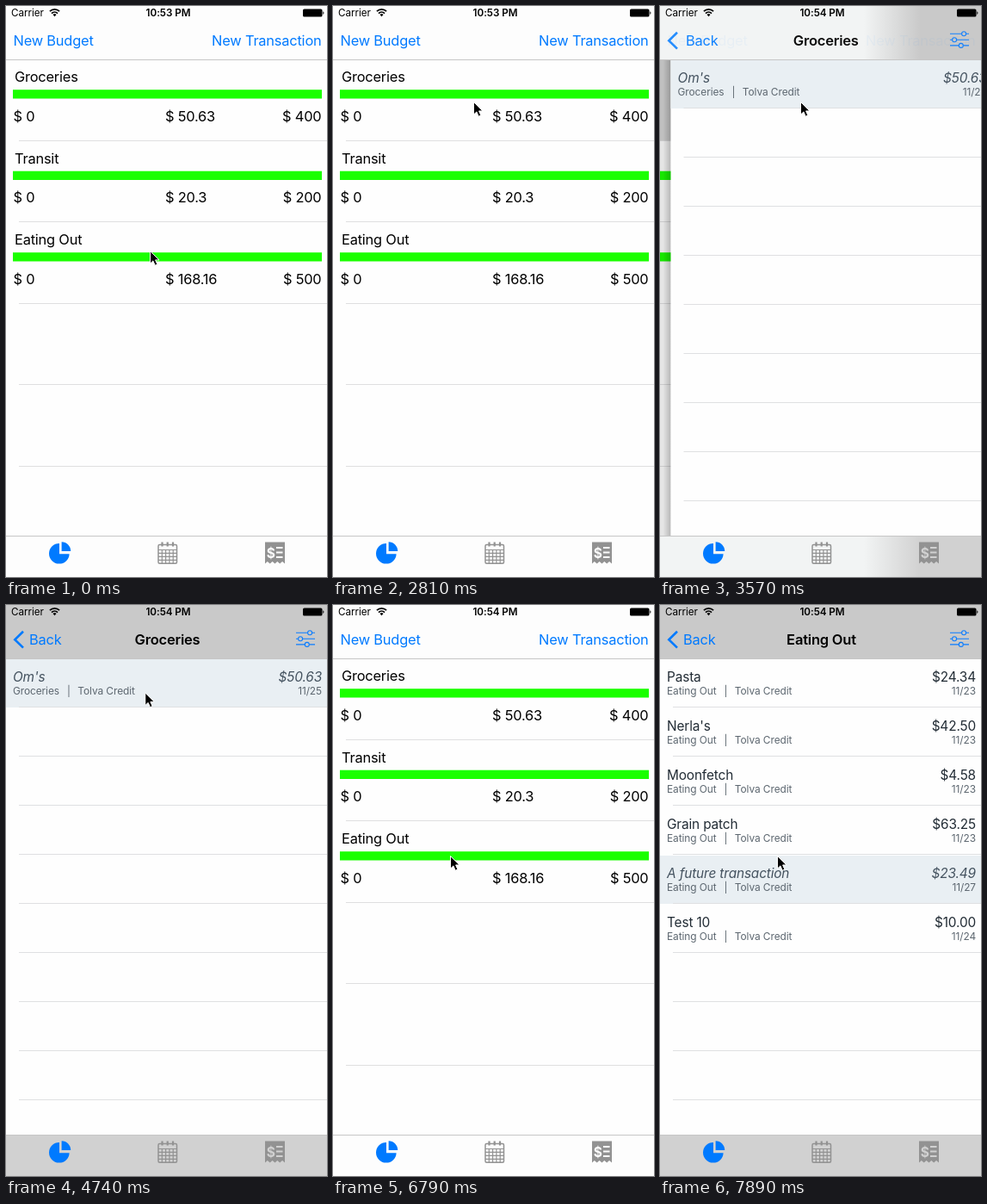
These frames come from a looping animation (373 px wide and 663 px high, 8000 ms). An HTML page:

```html
<!DOCTYPE html>
<html lang="en">
<head>
<meta charset="utf-8">
<title>Budget app</title>
<style>
  html, body { margin: 0; width: 100%; height: 100%; overflow: hidden; background: #fefefe; }
  svg { display: block; width: 373px; height: 663px; }
  text { font-family: Inter, "Open Sans", sans-serif; font-size: 16.4px; letter-spacing: -.2px; white-space: pre; }
  .end { text-anchor: end; }
  .mid { text-anchor: middle; }
  .blue { fill: #007aff; }
  .title { font-weight: 600; font-size: 16.5px; }
  .status { font-size: 11.7px; letter-spacing: -.05px; }
  .name { font-size: 15.4px; fill: #222c35; letter-spacing: -.15px; }
  .sub { font-size: 11.9px; fill: #5d6770; letter-spacing: -.08px; }
  .future .name { font-style: italic; fill: #44525f; }
</style>
</head>
<body>
<svg id="stage" viewBox="0 0 373 663"></svg>
<script>
const W = 373, LOOP = 8000;
const PUSH_A = 3285, POP = 5665, PUSH_B = 7025, SLIDE = 545;
const BANK = 'Tolva Credit';

const budgets = [
  ['Groceries', '50.63', 400],
  ['Transit', '20.3', 200],
  ['Eating Out', '168.16', 500]
];
const details = [
  { title: 'Groceries', rows: [['Om\'s', '50.63', 25, true]] },
  { title: 'Eating Out', rows: [
    ['Pasta', '24.34', 23],
    ['Nerla\'s', '42.50', 23],
    ['Moonfetch', '4.58', 23],
    ['Grain patch', '63.25', 23],
    ['A future transaction', '23.49', 27, true],
    ['Test 10', '10.00', 24]
  ] }
];

// Cursor tip: time, x, y
const path = [
  [0, 167, 284], [200, 167, 284], [380, 164, 322], [620, 173, 392], [980, 177, 297],
  [1070, 177, 297], [1210, 177, 311], [2070, 177, 311], [2360, 154, 225], [2560, 142, 150],
  [2810, 163, 111], [4480, 163, 111], [4570, 164, 106], [4700, 164, 106], [4910, 150, 83],
  [5050, 150, 83], [5370, 30, 36], [5860, 30, 36], [6340, 100, 173], [6600, 126, 250],
  [6790, 136, 291], [LOOP, 136, 291]
];

const text = (x, y, s, cls = '') => `<text x="${x}" y="${y}" class="${cls}">${s}</text>`;
const rect = (x, y, w, h, fill, more = '') =>
  `<rect x="${x}" y="${y}" width="${w}" height="${h}" fill="${fill}" ${more}/>`;
const range = n => [...Array(n).keys()];

function budgetRow([name, left, total], i) {
  const y = 62 + i * 94.5;
  return rect(0, y + .5, W, 94, '#d5d5d5', `id="pick${i}"`) +
    rect(8, y + 35.2, 359, 10.3, '#1aff00', `id="bar${i}"`) +
    text(10, y + 26, name) + text(8.5, y + 71.5, '$ 0') +
    text(185, y + 71.5, '$ ' + left) + text(366.5, y + 71.5, '$ ' + total, 'end');
}

function detailRow(group, [name, sum, day, future], i) {
  const y = 62 + i * 57;
  return `<g class="${future ? 'future' : ''}">` +
    (future ? rect(0, y + 1, W, 56, '#e9eff3') : '') +
    text(8, y + 26.5, name, 'name') + text(367, y + 26.5, '$' + sum, 'name end') +
    `<text x="8" y="${y + 42}" class="sub">${group}<tspan dx="9">|</tspan><tspan dx="8.5">${BANK}</tspan></text>` +
    text(367, y + 42, '11/' + day, 'sub end') + '</g>';
}

const detailTable = (d, i) => `<g id="table${i}">` +
  d.rows.map((r, k) => detailRow(d.title, r, k)).join('') + '</g>';

const pie = `<g fill="#007aff">
  <path d="M62 624A11.8 11.8 0 1 0 73.6 636.2H62Z"/>
  <path d="M64.6 622.2A10.6 10.6 0 0 1 75.2 633H64.6Z"/></g>`;

const calendar = `<g fill="none" stroke="#929292" stroke-width="1.2">
  <rect x="177" y="625.5" width="21.5" height="21.8" rx="1.5" stroke-width="1.5"/>
  <path d="M177 631.5h21.5M177 635.4h21.5M177 639.4h21.5M177 643.4h21.5"/>
  <path d="${range(4).map(i => `M${181.3 + i * 4.3} 631.5v15.5`).join('')}"/>
  <path d="M181.5 622.5v5M187.7 622.5v5M194 622.5v5" stroke-width="2.2"/></g>`;

const receipt = `<mask id="cut">${rect(295, 615, 40, 40, '#fff')}
  <text x="307.8" y="641" class="mid" style="font-size:15.5px;font-weight:700">$</text>
  <path d="M314 629h7.5M314 634.5h7.5M314 640h7.5" stroke="#000" stroke-width="2"/></mask>
  <path mask="url(#cut)" fill="#929292" d="M301 622.5H324V647.5l-2.9-2.6-2.9 2.6-2.9-2.6-2.8 2.6-2.9-2.6-2.9 2.6-2.9-2.6-2.8 2.6Z"/>`;

const wifi = `<g fill="none" stroke="#000" stroke-width="1.7">
  <path d="M50.9 6.2a8 8 0 0 1 11.2 0M53 8.6a5 5 0 0 1 7 0"/>
  <path d="M56.5 12.2l-2-2.2a3 3 0 0 1 4 0z" fill="#000" stroke="none"/></g>`;

const battery = rect(345, 3.5, 22.5, 9, '#000', 'rx="1.6"') +
  '<path d="M368.3 6.3a2 2 0 0 1 0 3.6z"/>';

const sliders = `<g id="sliders" fill="none" stroke="#0a7cff" stroke-width="1.1">
  <path d="M337 32.3h13.5M355.7 32.3h3.3M337 39.2h2.5M344.7 39.2H359M337 45.9h10.2M352.4 45.9h6.6"/>
  <circle cx="353.1" cy="32.3" r="2.5"/><circle cx="342.1" cy="39.2" r="2.5"/><circle cx="349.8" cy="45.9" r="2.5"/></g>`;

const stage = document.getElementById('stage');
stage.innerHTML = `
  <defs>
    <linearGradient id="glass" gradientUnits="userSpaceOnUse" y1="0" y2="0">
      <stop id="glassA" offset="0"/><stop id="glassB" offset="1" stop-opacity="0"/>
    </linearGradient>
    <linearGradient id="edge"><stop stop-opacity="0"/><stop offset="1" stop-opacity=".2"/></linearGradient>
  </defs>
  <g id="home">
    ${rect(0, 0, W, 663, '#fefefe')}
    ${budgets.map(budgetRow).join('')}
    ${range(5).map(i => rect(15, Math.floor(156 + i * 94.5), 358, 1, '#dfdfe0')).join('')}
    ${rect(0, 0, W, 663, '#000', 'id="dim"')}
  </g>
  <g id="detail">
    ${rect(-9, 62, 9, 554, 'url(#edge)')}
    ${rect(0, 62, W, 554, '#fefefe')}
    ${details.map(detailTable).join('')}
    ${range(9).map(i => rect(15, 118 + i * 57, 358, 1, '#dfe0e2')).join('')}
  </g>
  ${rect(0, 0, W, 62, '#c9c9c9')}${rect(0, 615, W, 48, '#d1d1d1')}
  ${rect(0, 0, W, 62, 'url(#glass)')}${rect(0, 615, W, 48, 'url(#glass)')}
  ${rect(0, 62, W, 1, '#c6c6c6')}${rect(0, 615, W, 1, '#c6c6c6')}
  <g id="homeNav">${text(8.5, 46, 'New Budget', 'blue')}${text(366.5, 46, 'New Transaction', 'blue end')}</g>
  <g id="detailNav">
    <path id="chevron" d="M20 30.8L10.3 40.2L20 49.6" fill="none" stroke="#007aff" stroke-width="2.6"/>
    <text id="back" y="46" class="blue">Back</text>
    <text id="title" y="46" class="title mid"></text>
    ${sliders}
  </g>
  ${text(6, 12.4, 'Carrier', 'status')}${wifi}
  <text id="clock" x="188.5" y="12.4" class="status mid" style="font-weight:600"></text>
  ${battery}${pie}${calendar}${receipt}
  <path id="cursor" d="M.5 .5V15L3.9 11.9L6.2 17.2L8.9 16L6.6 10.9H11Z" stroke="#fff" stroke-width="1"/>`;

const el = {};
stage.querySelectorAll('[id]').forEach(n => el[n.id] = n);
const set = (id, attrs) => { for (const k in attrs) el[id].setAttribute(k, attrs[k]); };
const show = (id, on) => el[id].style.display = on ? '' : 'none';

function spring(ms) {
  const u = 18.26 * Math.max(0, ms) / 1000;
  return 1 - (1 + u) * Math.exp(-u);
}

// 0 = budget list, 1 = transactions
function progress(t) {
  if (t < PUSH_A) return 0;
  if (t < POP) return t < PUSH_A + SLIDE ? spring(t - PUSH_A) : 1;
  if (t < PUSH_B) return t < POP + SLIDE ? 1 - spring(t - POP) : 0;
  return t < PUSH_B + SLIDE ? spring(t - PUSH_B) : 1;
}

function cursorAt(t) {
  const i = path.findIndex(k => k[0] > t);
  const [t0, x0, y0] = path[i - 1], [t1, x1, y1] = path[i];
  const f = (t - t0) / (t1 - t0);
  return [x0 + (x1 - x0) * f, y0 + (y1 - y0) * f];
}

function draw(t) {
  const p = progress(t), q = 1 - p, x = W * q;
  const page = t < 6500 ? 0 : 1;
  const pressed = t >= 5540 && t < POP;
  const picks = [t >= 3250 && t < POP, false, t >= 6960];

  set('home', { transform: `translate(${-.3 * W * p} 0)` });
  set('dim', { opacity: .1 * p });
  set('detail', { transform: `translate(${x} 0)` });
  show('detail', p > 0);
  picks.forEach((on, i) => { show('pick' + i, on); show('bar' + i, !on); });
  details.forEach((d, i) => show('table' + i, i === page));

  // Light from the list shows through the bars until it has left.
  const edge = p === 0 ? 900 : p === 1 ? -900 : W - .3 * W * p;
  const light = `rgb(${253 - 11 * p},${253 - 9 * p},${253 - 9 * p})`;
  set('glass', { x1: edge - 28, x2: edge + 38 });
  set('glassA', { 'stop-color': light });
  set('glassB', { 'stop-color': light });

  set('homeNav', { opacity: p === 1 ? 0 : .04 + .96 * q * q });
  show('detailNav', p > 0);
  set('chevron', { opacity: pressed ? .3 : p ** 5 });
  set('back', { x: 27 + .242 * x, opacity: pressed ? .3 : p ** 2 });
  set('title', { x: 187.5 + .42 * x, opacity: p ** 1.6 });
  set('sliders', { opacity: p ** 1.5 });
  el.title.textContent = details[page].title;
  el.clock.textContent = t < 3250 ? '10:53 PM' : '10:54 PM';
  set('cursor', { transform: `translate(${cursorAt(t)})` });
}

function tick() {
  draw(performance.now() % LOOP);
  requestAnimationFrame(tick);
}
tick();
</script>
</body>
</html>
```
